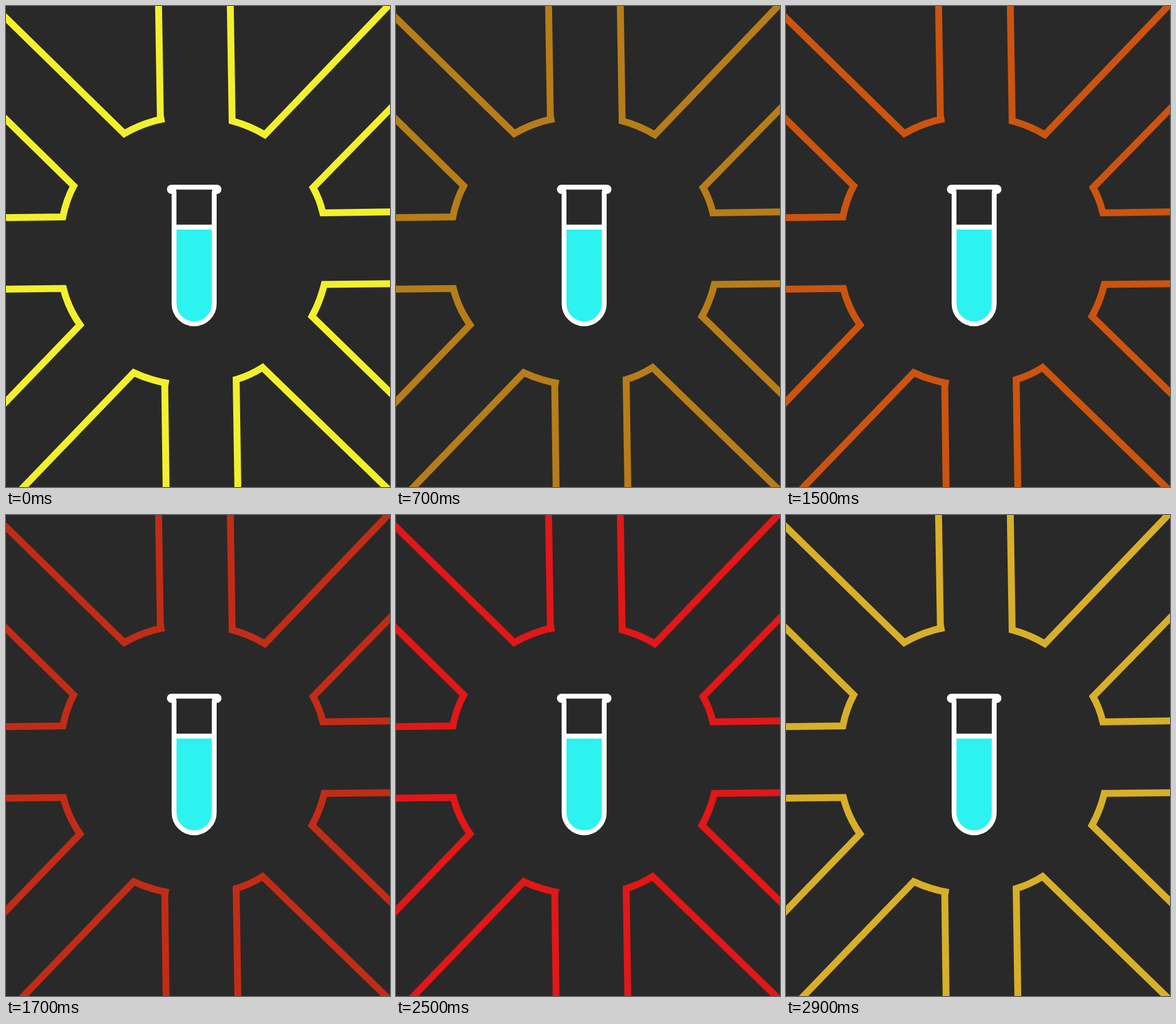
An HTML page for the animation above (3000 ms loop, 669 by 837 pixels).

```html
<!DOCTYPE html>
<html lang="en">
<head>
<meta charset="utf-8">
<title>Test tube</title>
<style>
  html, body { margin: 0; width: 100%; height: 100%; overflow: hidden; background: #292929; }
  svg { display: block; width: 669px; height: 837px; }
</style>
</head>
<body>
<svg viewBox="0 0 669 837">
  <rect width="669" height="837" fill="#292929"/>
  <g id="rays" fill="none" stroke="#f2f02c" stroke-width="12" stroke-miterlimit="8">
    <path d="M-10 11L206 222Q239 203 276 196M269 198L265.7 -5"/>
    <path d="M390.7 -5L394 200Q424 208 451 224L675 -10"/>
    <path d="M680 168L535 316Q546 335 552 360L680 358"/>
    <path d="M680 483L554.5 484.5Q547 515 533 540L680 683"/>
    <path d="M404 845L401 650Q425 643 447 629L670 845"/>
    <path d="M279 845L276.5 655M283.5 657Q250 651 222.5 638L23 845"/>
    <path d="M-10 699L129 555Q108 525 100 491.5L-10 493"/>
    <path d="M-10 187.5L118 313Q105 337 99 367L-10 368.5"/>
  </g>
  <path d="M296 385H360V518A32 32 0 0 1 296 518Z" fill="#2cf3f0"/>
  <g fill="none" stroke="#fff" stroke-width="8.4">
    <path d="M292.8 323.5V518A35 35 0 0 0 362.8 518V323.5" stroke-linecap="round"/>
    <path d="M293 384.7H363M288 315.2H368"/>
  </g>
  <g fill="#fff">
    <circle cx="288.5" cy="319" r="8.1"/>
    <circle cx="367.3" cy="319" r="8.1"/>
  </g>
</svg>
<script>
  const LOOP = 3000, FADE = 500, STEP = 100;
  const BACK = [41, 41, 41];
  // Stacked from bottom to top
  const COLORS = [[242, 240, 44], [224, 109, 7], [255, 13, 20]];
  const rays = document.getElementById('rays');

  const over = (base, top, alpha) => base.map((v, i) => v + (top[i] - v) * alpha);

  function rayColor(ms) {
    const phase = Math.floor(ms / 1000);
    let step = Math.max(0, Math.floor((ms % 1000 - FADE) / STEP) + 1);
    if (phase === 1 && step === 4) step = 3; // the middle tone holds twice as long
    const p = step / 6;
    const alpha = [0, 0, 0];
    alpha[phase] = 1 - p;
    alpha[(phase + 1) % 3] = p;
    return COLORS.reduce((mix, color, i) => over(mix, color, alpha[i]), BACK);
  }

  function draw(now) {
    rays.setAttribute('stroke', `rgb(${rayColor(now % LOOP).map(Math.round)})`);
  }

  const start = performance.now();
  function tick() {
    draw(performance.now() - start);
    requestAnimationFrame(tick);
  }
  tick();
</script>
</body>
</html>
```
